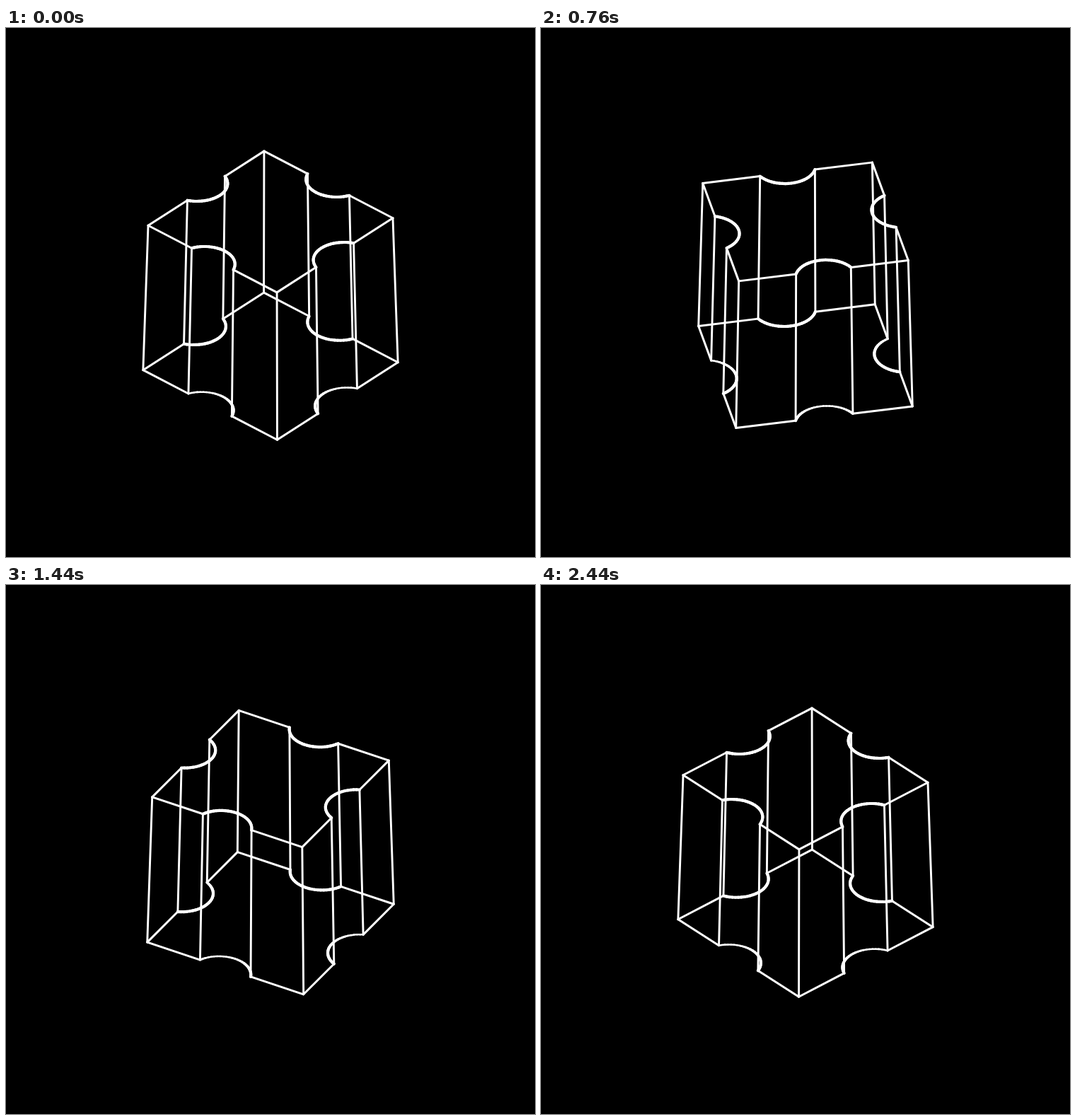
These frames come from a looping animation (748x748 px, 2.48 s). An HTML page with a canvas:

```html
<!DOCTYPE html>
<html lang="en">
<head>
<meta charset="utf-8">
<title>Rotating wireframe prism</title>
<style>
  html, body { margin: 0; width: 100%; height: 100%; overflow: hidden; background: #000; }
  canvas { display: block; width: 748px; height: 748px; }
</style>
</head>
<body>
<canvas id="stage" width="748" height="748"></canvas>
<script>
const ctx = document.getElementById('stage').getContext('2d');
const LOOP = 2480, TICK = 40, FPS = 24;
const CX = 374, TILT = 1 / Math.sqrt(3), RAD = Math.PI / 180;

// Isometric caps; the lower one is slightly larger.
const TOP = { y: 274, scale: 1 };
const BOTTOM = { y: 478.2, scale: 1.0415 };

const HALF = 100 * Math.sqrt(1.5);   // half the side of the square
const NOTCH = HALF * 0.324;          // half the width of a notch
const RADIUS = HALF * Math.SQRT1_2 / 2;
const OFFSET = Math.sqrt(RADIUS ** 2 - NOTCH ** 2); // notch centre, outside the side
const SPREAD = Math.atan2(NOTCH, OFFSET);
const SEGMENTS = 24;

// Point on a cap: n along the side's normal, e along the side.
function point(cap, angle, n, e) {
  const c = Math.cos(angle), s = Math.sin(angle);
  return [
    CX + cap.scale * (n * c - e * s),
    cap.y + cap.scale * TILT * (n * s + e * c)
  ];
}

function line(a, b, width) {
  ctx.lineWidth = width;
  ctx.beginPath();
  ctx.moveTo(...a);
  ctx.lineTo(...b);
  ctx.stroke();
}

function notch(cap, angle) {
  const at = t => point(cap, angle,
    HALF + OFFSET - RADIUS * Math.cos(t), RADIUS * Math.sin(t));
  const step = 2 * SPREAD / SEGMENTS;
  for (let i = 0; i < SEGMENTS; i++) {
    const t = -SPREAD + i * step;
    // The lower arcs thin out where they crest.
    const crest = cap === BOTTOM ? Math.max(0, Math.sin(angle - t - step / 2)) : 0;
    line(at(t), at(t + step), 4.2 - 1.7 * crest ** 2);
  }
}

function side(angle) {
  for (const cap of [TOP, BOTTOM]) {
    for (const k of [-1, 1]) {
      line(point(cap, angle, HALF, k * HALF), point(cap, angle, HALF, k * NOTCH), 3);
    }
    notch(cap, angle);
  }
  for (const e of [-HALF, -NOTCH, NOTCH]) {
    line(point(TOP, angle, HALF, e), point(BOTTOM, angle, HALF, e), 2.9);
  }
}

function draw(time) {
  const tick = Math.floor((time % LOOP) / TICK) * TICK;
  const step = Math.floor(tick * FPS / 1000);
  const turn = -3 * (step + 1);
  ctx.fillStyle = '#000';
  ctx.fillRect(0, 0, 748, 748);
  ctx.strokeStyle = '#fff';
  ctx.lineCap = 'round';
  for (let i = 0; i < 4; i++) side((turn - 45 + 90 * i) * RAD);
}

const start = performance.now();
function frame() {
  draw(performance.now() - start);
  requestAnimationFrame(frame);
}
frame();
</script>
</body>
</html>
```
